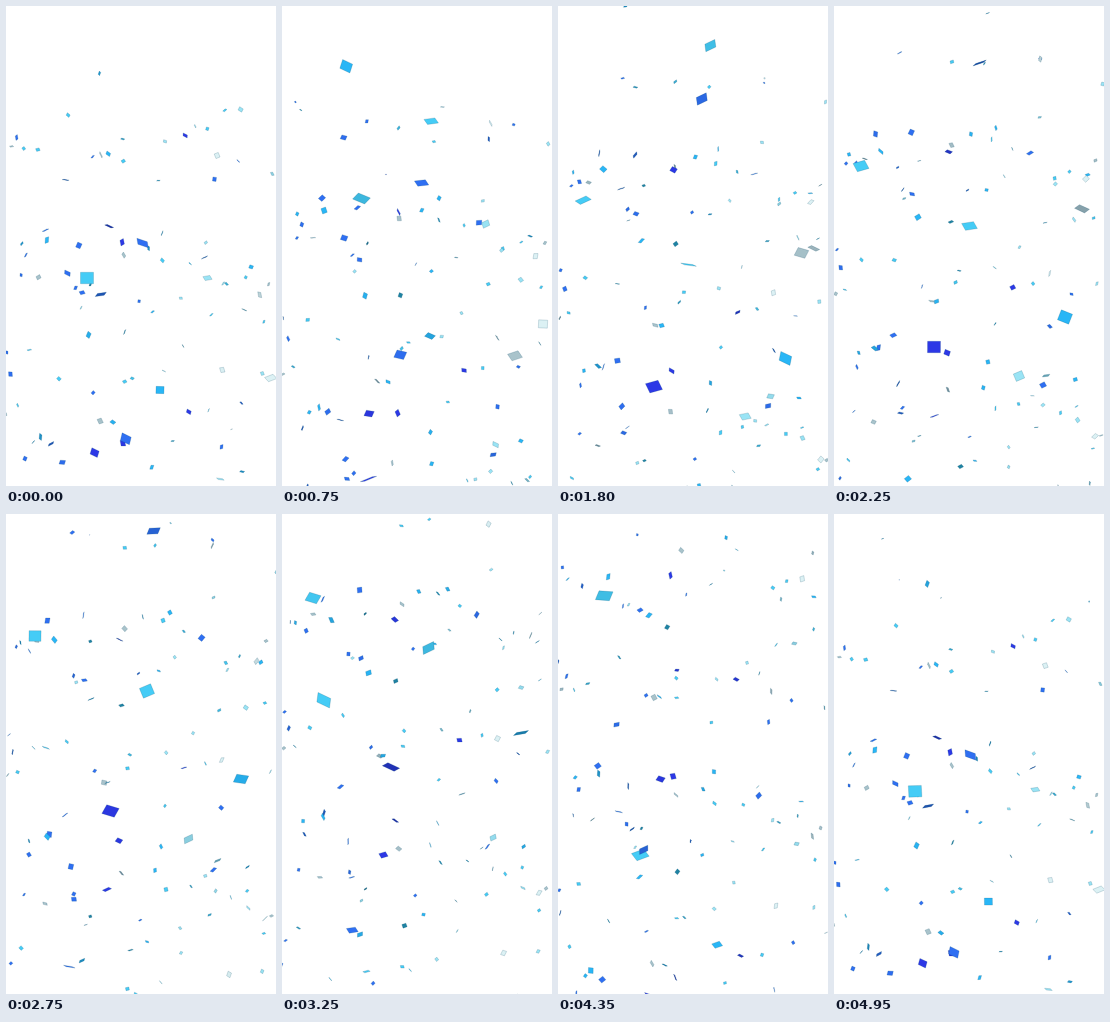
These frames come from a looping animation (270 px wide and 480 px high, 5 s). An HTML page with a canvas:

```html
<!DOCTYPE html>
<html lang="en">
<head>
<meta charset="utf-8">
<title>Rising confetti</title>
<style>
  html, body { margin: 0; width: 100%; height: 100%; overflow: hidden; background: #fff; }
  canvas { display: block; width: 270px; height: 480px; }
</style>
</head>
<body>
<canvas id="stage" width="270" height="480"></canvas>
<script>
const ctx = document.getElementById('stage').getContext('2d');
const WIDTH = 270, HEIGHT = 480, LOOP = 5, STEP = 0.05;

const navy = '#2d38e6', blue = '#2f6ff2', azure = '#29b6f6', cyan = '#45ccf6',
      pale = '#9ae4f5', mist = '#dcf1f4', slate = '#a9c3cb', teal = '#1f83a3';
const smallColors = [navy, blue, blue, blue, azure, azure, azure, cyan, cyan, cyan, pale, pale, mist, slate, teal];

// Near pieces: time, x, y, drift, rise speed, size, half life, colour
const nearPieces = [
  [0, 81, 272, -2, 106, 13, 1.9, cyan],
  [0.4, 119, 388, -2, 112, 10, 0.9, blue],
  [2.75, 141, 177, 11, 86, 12, 1.4, cyan],
  [2.25, 100, 341, 9, 88, 13, 2.2, navy],
  [0.3, 88, 431, -2, 52, 8, 1.2, navy],
  [1.35, 142, 129, 4, 80, 11, 1.9, blue],
  [2.75, 29, 122, 4, 76, 12, 1.6, cyan],
  [2.25, 231, 311, 8, 92, 12, 1.5, azure],
  [2.25, 185, 370, -5, 90, 9, 1.2, pale],
  [1.35, 239, 291, 10, 98, 11, 1.4, slate],
  [1.35, 213, 411, -1, 46, 6, 2.3, pale],
  [0.5, 203, 236, 3, 72, 7, 1.1, pale],
  [0, 154, 384, -8, 72, 8, 1.4, azure],
  [0.6, 62, 239, 1, 47, 6, 1.8, blue],
  [-1.2, 78, 376, 14, 73, 9, 1.7, blue],
  [-1.2, 102, 303, 1, 69, 7, 2, navy],
  [1, 65, 46, 3, 57, 11, 0.9, azure],
  [1.35, 151, 72, 3, 72, 11, 1, cyan],
  [0.75, 261, 318, -5, 72, 9, 1.5, mist],
  [3.8, 44, 134, 4, 95, 14, 1.2, cyan]
];

const clamp = v => Math.max(0, Math.min(1, v));

function seededRandom(seed) {
  return () => {
    seed = (seed * 1664525 + 1013904223) >>> 0;
    return seed / 4294967296;
  };
}

const random = seededRandom(2718);
const between = (a, b) => a + random() * (b - a);

const farPieces = Array.from({ length: 54 }, (_, i) => ({
  x: ((i * 0.618034) % 1) * (WIDTH + 10) - 5,
  phase: between(0, LOOP),
  speed: between(39, 57),
  drift: between(-2.5, 2.5),
  size: 2.8 + 2.9 * random() ** 1.6,
  spin: between(1.2, 3),
  turn: between(0, 6.28),
  color: smallColors[Math.floor(random() * smallColors.length)],
  ceiling: between(-12, 30)
}));

// A flat card turned in the plane by `turn` and tipped away by `tilt`
function drawCard(x, y, size, color, turn, tilt) {
  if (size < 0.4) return;
  const squash = Math.max(0.12, Math.abs(Math.cos(tilt)));
  const w = size / 2, h = size * 0.44 * squash, slant = size * 0.16 * Math.sin(tilt);
  ctx.save();
  ctx.translate(x, y);
  ctx.rotate(turn);
  ctx.beginPath();
  ctx.moveTo(-w + slant, -h);
  ctx.lineTo(w + slant, -h);
  ctx.lineTo(w - slant, h);
  ctx.lineTo(-w - slant, h);
  ctx.closePath();
  ctx.fillStyle = color;
  ctx.fill();
  ctx.fillStyle = `rgba(0, 30, 50, ${0.42 * Math.max(0, Math.sin(tilt)) ** 4})`;
  ctx.fill();
  ctx.strokeStyle = 'rgba(0, 70, 100, 0.28)';
  ctx.lineWidth = 0.6;
  ctx.stroke();
  ctx.restore();
}

function drawFar(p, t) {
  const top = 40 + 50 * Math.cos((t - 0.9) / LOOP * 2 * Math.PI) + p.ceiling;
  for (let lap = 0; lap < 3; lap++) {
    const age = t + p.phase + lap * LOOP;
    const y = HEIGHT + 6 - p.speed * age + (p.phase + t > LOOP ? 0 : 0);
    if (y < -6) continue;
    const x = p.x + p.drift * age + 2 * Math.sin(age + p.turn);
    drawCard(x, y, p.size * clamp((y - top) / 12), p.color,
             p.turn + 0.5 * Math.sin(age * 1.3), p.turn + age * p.spin);
  }
  // The next piece of the same column enters before the loop ends
  const early = t + p.phase - LOOP;
  if (early > 0) {
    const x = p.x + p.drift * early + 2 * Math.sin(early + p.turn);
    drawCard(x, HEIGHT + 6 - p.speed * early, p.size, p.color,
             p.turn + 0.5 * Math.sin(early * 1.3), p.turn + early * p.spin);
  }
}

function drawNear([time, x, y, drift, rise, size, half, color], index, t) {
  for (let lap = -1; lap <= 1; lap++) {
    const age = t + lap * LOOP - time;
    if (Math.abs(age) > half) continue;
    const scale = clamp((half - Math.abs(age)) / 0.35);
    drawCard(x + drift * age, y - rise * age, size * scale, color,
             0.45 * Math.sin(index * 2.1 + age * 1.4), age * (1.1 + index % 3 * 0.25));
  }
}

function render(now) {
  const t = Math.floor((now / 1000 % LOOP) / STEP + 1e-6) * STEP;
  ctx.fillStyle = '#fff';
  ctx.fillRect(0, 0, WIDTH, HEIGHT);
  farPieces.forEach(p => drawFar(p, t));
  nearPieces.forEach((p, i) => drawNear(p, i, t));
}

const start = performance.now();
function tick() {
  render(performance.now() - start);
  requestAnimationFrame(tick);
}
tick();
</script>
</body>
</html>
```
